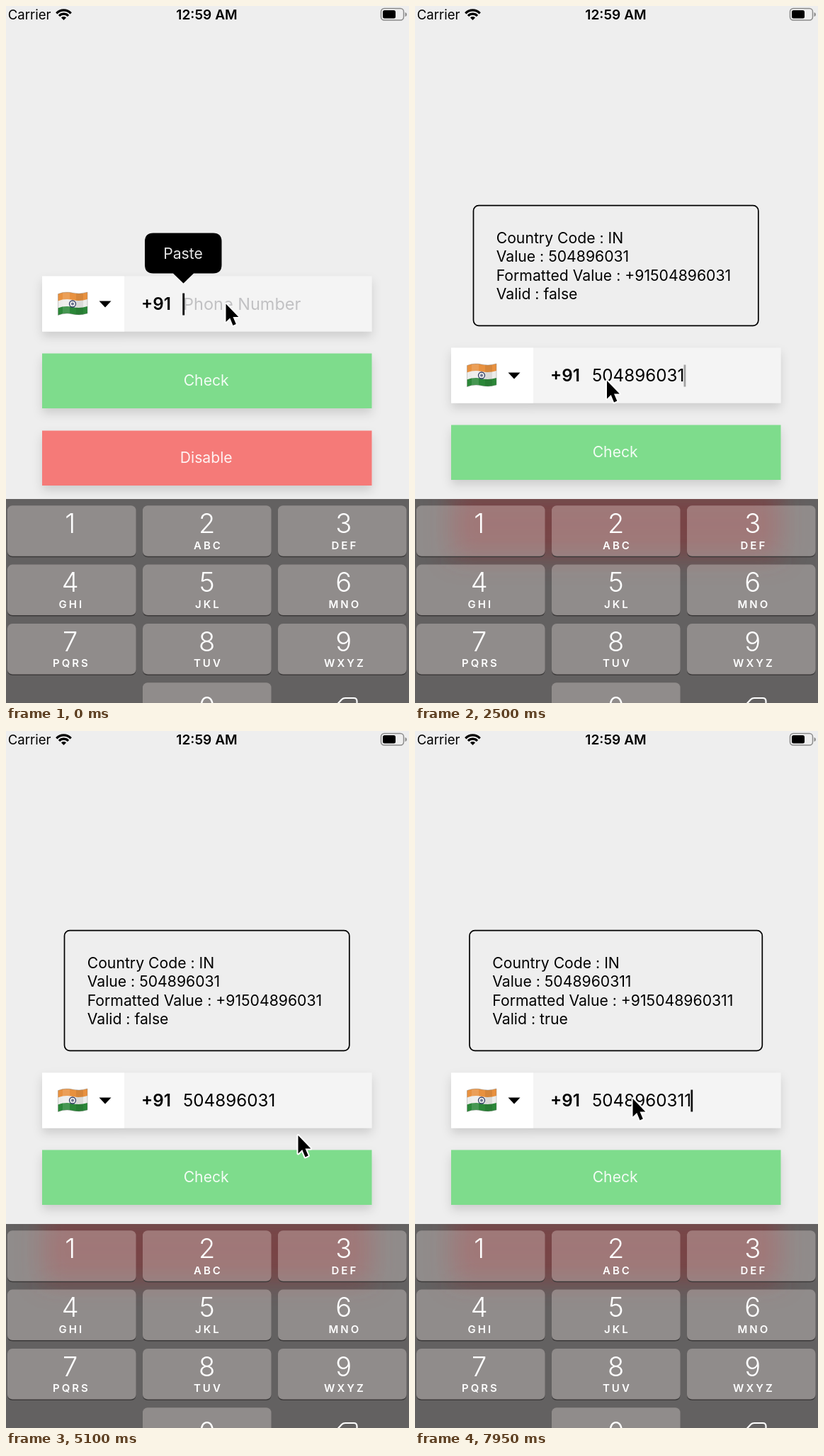
An HTML page that plays this animation: 569x984 px, repeating every 8 s.

```html
<!DOCTYPE html>
<html lang="en">
<head>
<meta charset="utf-8">
<title>Phone input</title>
<style>
  html, body { margin: 0; width: 100%; height: 100%; overflow: hidden; background: #eee; }
  svg { display: block; width: 100%; height: 100%; }
  text { font-family: Inter, Roboto, sans-serif; white-space: pre; }
  .mid { text-anchor: middle; }
  .label { font-size: 21.2px; }
  .white { fill: #fff; fill-opacity: .9; }
  .input { font-size: 24.2px; }
  .digit { font-size: 38px; font-weight: 350; fill: #fff; }
  .letters { font-size: 15px; font-weight: 600; letter-spacing: 3px; fill: #fff; }
</style>
</head>
<body>
<svg viewBox="0 0 569 984" preserveAspectRatio="none">
  <defs>
    <filter id="shadow" x="-10%" y="-30%" width="120%" height="180%">
      <feDropShadow dx="0" dy="7" stdDeviation="7" flood-color="#000" flood-opacity=".14"/>
    </filter>
    <filter id="blur" x="-20%" y="-80%" width="140%" height="260%">
      <feGaussianBlur stdDeviation="18"/>
    </filter>
    <clipPath id="pad"><rect y="696" width="569" height="288"/></clipPath>
    <clipPath id="flag">
      <path d="M73.5 406.5Q84 402.500 94 405T115 404V434Q104 437.500 94 435T73.5 436.500Z"/>
    </clipPath>
  </defs>
  <rect width="569" height="984" fill="#eee"/>

  <!-- status bar -->
  <text x="2.7" y="19" font-size="18.6">Carrier</text>
  <g fill="none" stroke="#000" stroke-width="3.2">
    <path d="M71.3 10.3A14 14 0 0 1 91.7 10.3"/>
    <path d="M75 14A9 9 0 0 1 88 14"/>
    <path d="M78 16.5A5 5 0 0 1 85 16.5L81.5 20Z" fill="#000" stroke="none"/>
  </g>
  <text class="mid" x="283.5" y="19" font-size="19.1" font-weight="600">12:59 AM</text>
  <rect x="529.5" y="3.5" width="32" height="16.5" rx="4.5" fill="none" stroke="#8b8b8b" stroke-width="1.5"/>
  <rect x="532" y="6" width="18" height="11.5" rx="2.5"/>
  <path d="M563.5 9Q566 9.5 566 12T563.5 15Z" fill="#8b8b8b"/>

  <g id="result">
    <rect id="frame" y="281.7" height="169.6" rx="7.5" fill="none" stroke="#000" stroke-width="1.7"/>
    <g id="lines" class="label"></g>
  </g>

  <g id="form">
    <g filter="url(#shadow)">
      <rect x="51" y="381.5" width="465.5" height="78" fill="#f4f4f4"/>
      <rect x="51" y="381.5" width="116" height="78" fill="#fff"/>
    </g>
    <g clip-path="url(#flag)">
      <rect x="73" y="400" width="42" height="40" fill="#ececea"/>
      <path d="M73 400H115V414Q104 417.500 94 415T73 416.500Z" fill="#e8913f"/>
      <path d="M73 426.500Q84 422.500 94 425T115 424V440H73Z" fill="#2b8738"/>
      <path d="M80 400H90V440H80Z" fill="#fff" opacity=".13"/>
      <path d="M99 400H109V440H99Z" opacity=".08"/>
    </g>
    <path d="M73.5 406.5Q84 402.500 94 405T115 404V434Q104 437.500 94 435T73.5 436.500Z" fill="none" stroke="#777" stroke-opacity=".5" stroke-width=".7"/>
    <circle cx="94" cy="420.500" r="4.5" fill="none" stroke="#344068" stroke-width="1.3"/>
    <circle cx="94" cy="420.500" r="2" fill="#344068" opacity=".7"/>
    <path d="M131.5 416.5H148.5L140 425.5Z"/>
    <text class="input" x="191" y="429" font-weight="600">+91</text>
    <text id="hint" x="250" y="429" font-size="23.5" fill="#c1c1c3">Phone Number</text>
    <text id="number" class="input" x="250" y="429"></text>
    <rect id="caret" y="405.5" width="2.8" height="31"/>
    <rect x="51" y="490.5" width="465.5" height="77.5" fill="#7edc8c" filter="url(#shadow)"/>
    <text class="mid label white" x="282.7" y="536.3">Check</text>
    <rect x="51" y="599.5" width="465.5" height="77.5" fill="#f57a78" filter="url(#shadow)"/>
    <text class="mid label white" x="282.7" y="645">Disable</text>
  </g>

  <g id="popup">
    <path d="M208 320.5H292.5Q304.5 320.5 304.5 332.5V365.5Q304.5 377.5 292.5 377.5H265L250.5 391.5L236 377.5H208Q196 377.5 196 365.5V332.5Q196 320.5 208 320.5Z"/>
    <text class="mid label white" x="250" y="357">Paste</text>
  </g>

  <g clip-path="url(#pad)">
    <rect y="696" width="569" height="288" fill="#636161"/>
    <rect id="glow" x="51" y="684" width="465.5" height="94" fill="#8a2f31" opacity=".56" filter="url(#blur)"/>
    <g id="keys"></g>
    <path d="M463 991L474 979Q476 977 479 977H491Q495.500 977 495.500 981.500V1004H474Z" fill="none" stroke="#fff" stroke-width="2.2"/>
  </g>

  <path id="cursor" d="M1 1V26.500L6.700 21L11 31.500L15.300 29.500L11 19.500H18.800Z" stroke="#fff" stroke-width="4" stroke-linejoin="round" paint-order="stroke"/>
</svg>
<script>
const LOOP = 8000, SHIFT = 101;
const FIRST_CHECK = 2450, LAST_DIGIT = 6590, SECOND_CHECK = 7350;
const SHORT = '504896031', FULL = SHORT + '1';
const $ = id => document.getElementById(id);

function add(parent, tag, attrs, text = '') {
  const el = document.createElementNS('http://www.w3.org/2000/svg', tag);
  for (const name in attrs) el.setAttribute(name, attrs[name]);
  el.textContent = text;
  parent.append(el);
  return el;
}

function drawKeys() {
  const letters = ['', 'ABC', 'DEF', 'GHI', 'JKL', 'MNO', 'PQRS', 'TUV', 'WXYZ'];
  const key = (x, y) => {
    add($('keys'), 'path', {
      d: `M${x} ${y + 65}v.5q0 7.500 7.500 7.500h166.500q7.500 0 7.500 -7.500v-.5q0 6.500 -7.500 6.500h-166.500q-7.500 0 -7.500 -6.500z`,
      fill: '#3c3a3a'
    });
    add($('keys'), 'rect', { x, y, width: 181.5, height: 71.5, rx: 7, fill: '#fff4f2', opacity: .29 });
  };
  letters.forEach((word, i) => {
    const col = i % 3, y = 705.3 + Math.floor(i / 3) * 83.3, mid = 90.7 + col * 193;
    key(2 + col * 191, y);
    add($('keys'), 'text', { class: 'digit mid', x: mid, y: y + 38.7 }, i + 1);
    add($('keys'), 'text', { class: 'letters mid', x: mid + 1.7, y: y + 61.2 }, word);
  });
  key(193, 955.2);
  add($('keys'), 'text', { class: 'digit mid', x: 283.7, y: 1003 }, '0');
}

// time, x, y of the pointer tip
const path = [
  [0, 309.5, 419.5], [1950, 309.5, 419.5], [2350, 270, 528], [2600, 270, 528],
  [3200, 244.5, 545], [3700, 244.5, 545], [4700, 411.5, 570], [5300, 411.5, 570],
  [6100, 423.5, 538], [6700, 423.5, 538], [7150, 310, 622], [7450, 310, 622],
  [7850, 306.5, 518], [8000, 306.5, 518]
];

function pointer(t) {
  const i = path.findIndex(p => p[0] > t);
  const [t0, x0, y0] = path[i - 1], [t1, x1, y1] = path[i];
  const k = (t - t0) / (t1 - t0), e = k * k * (3 - 2 * k);
  return [x0 + (x1 - x0) * e, y0 + (y1 - y0) * e];
}

const clamp = v => Math.max(0, Math.min(1, v));

function caretAlpha(t) {
  if (t < 1850) return 1;
  const start = t < LAST_DIGIT ? 6295 : LAST_DIGIT;
  const phase = ((t - start) % 960 + 960) % 960;
  const rise = t < LAST_DIGIT ? clamp((phase + 5) / 150) : 1;
  return Math.min(rise, clamp((640 - phase) / 260));
}

function typed(t) {
  if (t >= LAST_DIGIT) return FULL;
  return SHORT.slice(0, Math.max(0, Math.floor((t + 50) / 205)));
}

const show = (el, on) => el.setAttribute('display', on ? 'inline' : 'none');
const lines = [0, 1, 2, 3].map(i => add($('lines'), 'text', { y: 335 + i * 26.4 }));
drawKeys();

function render(t) {
  const checked = t >= FIRST_CHECK, valid = t >= SECOND_CHECK;
  const value = typed(t), saved = valid ? FULL : SHORT;

  $('number').textContent = value;
  show($('hint'), !value);
  show($('popup'), !value);
  const end = value ? $('number').getComputedTextLength() : 0;
  $('caret').setAttribute('x', 249.3 + end);
  $('caret').setAttribute('opacity', caretAlpha(t));

  show($('result'), checked);
  show($('glow'), checked);
  $('form').setAttribute('transform', `translate(0 ${checked ? SHIFT : 0})`);
  $('frame').setAttribute('x', valid ? 77 : 82.5);
  $('frame').setAttribute('width', valid ? 413.3 : 402.3);
  ['Country Code : IN', `Value : ${saved}`, `Formatted Value : +91${saved}`, `Valid : ${valid}`]
    .forEach((line, i) => {
      lines[i].textContent = line;
      lines[i].setAttribute('x', valid ? 109.3 : 114.7);
    });

  $('cursor').setAttribute('transform', `translate(${pointer(t)})`);
}

const begin = performance.now();
function tick() {
  render((performance.now() - begin) % LOOP);
  requestAnimationFrame(tick);
}
tick();
</script>
</body>
</html>
```
